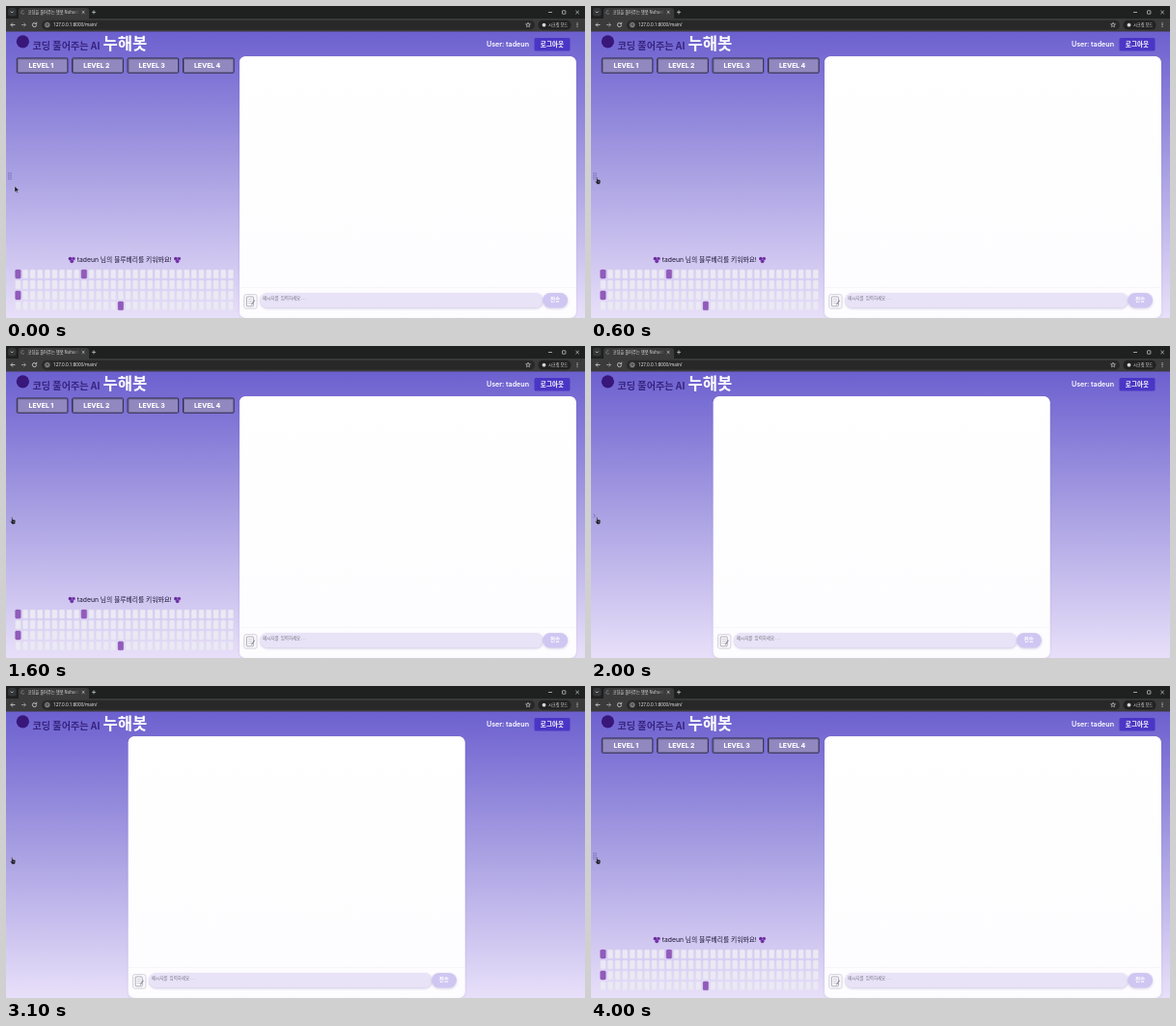
Write an HTML page with a canvas that moves like this. It is 600x323 px and loops after 4.1 s.

```html
<!DOCTYPE html>
<html lang="ko">
<head>
<meta charset="utf-8">
<style>
html, body { margin: 0; width: 100%; height: 100%; overflow: hidden; background: #6c61cf; }
canvas { display: block; width: 600px; height: 323px; }
</style>
</head>
<body>
<canvas id="stage"></canvas>
<script>
const W = 600, H = 323, LOOP = 4100;
const USER = 'tadeun', BRAND = '누해봇';
const KR = '"Noto Sans CJK KR", "Noto Sans CJK", sans-serif';
const MONO = '"Noto Sans Mono CJK KR", "Noto Sans CJK KR", "Noto Sans CJK", monospace';
const LATIN = 'Inter, ' + KR;

const cv = document.getElementById('stage');
const g = cv.getContext('2d');
const dpr = window.devicePixelRatio || 1;
cv.width = W * dpr;
cv.height = H * dpr;

function box(x, y, w, h, r, fill, stroke, lw = 1) {
  g.beginPath();
  g.roundRect(x, y, w, h, r);
  if (fill) { g.fillStyle = fill; g.fill(); }
  if (stroke) { g.strokeStyle = stroke; g.lineWidth = lw; g.stroke(); }
}

function disc(x, y, r, fill) {
  g.beginPath();
  g.arc(x, y, r, 0, Math.PI * 2);
  g.fillStyle = fill;
  g.fill();
}

function line(color, lw, ...p) {
  g.beginPath();
  g.moveTo(p[0], p[1]);
  for (let i = 2; i < p.length; i += 2) g.lineTo(p[i], p[i + 1]);
  g.strokeStyle = color;
  g.lineWidth = lw;
  g.stroke();
}

function text(s, x, y, size, color, weight = 400, align = 'left', family = KR) {
  g.font = `${weight} ${size}px ${family}`;
  g.textAlign = align;
  g.fillStyle = color;
  g.fillText(s, x, y);
}

function blend(x0, y0, x1, y1, ...colors) {
  const b = g.createLinearGradient(x0, y0, x1, y1);
  colors.forEach((c, i) => b.addColorStop(i / (colors.length - 1), c));
  return b;
}

function shadow(color, blur, dy) {
  g.shadowColor = color;
  g.shadowBlur = blur * dpr;
  g.shadowOffsetY = dy * dpr;
}

function browser() {
  const ink = '#d6d6d6';
  box(0, 0, W, 14, 0, '#1f2020');
  box(0, 13, W, 13.5, 0, '#3b3b3c');
  box(2, 2, 8.5, 8.5, 2.5, '#353637');
  line(ink, 0.8, 4.8, 5.6, 6.2, 7, 7.6, 5.6);
  box(13, 2, 73, 13, [3, 3, 0, 0], '#3b3b3c');
  g.beginPath();
  g.arc(17.5, 6.5, 1.8, 0.5, 5.3);
  g.strokeStyle = '#909090';
  g.lineWidth = 0.7;
  g.stroke();
  text('코딩을 풀어주는 챗봇 Nuhaeb', 22.5, 8.1, 4.25, blend(68, 0, 76, 0, '#e2e2e2', '#3b3b3c'));
  line(ink, 0.7, 78.7, 5, 81.5, 7.8);
  line(ink, 0.7, 81.5, 5, 78.7, 7.8);
  line(ink, 0.7, 89, 6.4, 93, 6.4);
  line(ink, 0.7, 91, 4.4, 91, 8.4);
  line(ink, 0.7, 562, 6.5, 566, 6.5);
  box(576.5, 4.8, 3.4, 3.4, 0.4, null, ink, 0.7);
  line(ink, 0.7, 590.4, 4.8, 593.8, 8.2);
  line(ink, 0.7, 593.8, 4.8, 590.4, 8.2);

  line(ink, 0.8, 9.4, 19.5, 5, 19.5);
  line(ink, 0.8, 7, 17.5, 5, 19.5, 7, 21.5);
  line('#a5a5a5', 0.8, 16, 19.5, 20.4, 19.5);
  line('#a5a5a5', 0.8, 18.4, 17.5, 20.4, 19.5, 18.4, 21.5);
  g.beginPath();
  g.arc(29.5, 19.5, 2.1, 0, 5.2);
  g.strokeStyle = ink;
  g.lineWidth = 0.8;
  g.stroke();
  line(ink, 0.8, 31.8, 16.8, 31.6, 18.6, 29.8, 18.5);

  box(37, 14.7, 511, 10, 5, '#282828');
  disc(42.8, 19.6, 3.6, '#3a3a3a');
  g.beginPath();
  g.arc(42.8, 19.6, 2, 0, 7);
  g.strokeStyle = ink;
  g.lineWidth = 0.6;
  g.stroke();
  line(ink, 0.6, 42.8, 19.3, 42.8, 20.7);
  text('127.0.0.1:8000/main/', 49, 21.4, 4.6, '#e6e6e6', 400, 'left', '"Noto Sans", sans-serif');

  g.beginPath();
  for (let i = 0; i < 10; i++) {
    const a = i * Math.PI / 5 - Math.PI / 2, r = i % 2 ? 1.1 : 2.6;
    g.lineTo(541 + r * Math.cos(a), 19.6 + r * Math.sin(a));
  }
  g.closePath();
  g.stroke();
  box(551.5, 14.8, 34, 9.8, 4.9, '#222223');
  disc(557.5, 19.7, 1.9, '#d6d6d6');
  text('시크릿 모드', 562, 21.3, 4.2, '#ededed');
  for (let i = -1; i < 2; i++) disc(592, 19.6 + i * 1.7, 0.55, ink);
}

function header() {
  disc(17.4, 36.8, 6.6, '#38167a');
  text('코딩 풀어주는 AI', 27.5, 44.8, 10.1, '#37247f', 700);
  text(BRAND, 100.5, 45.3, 16.6, '#ffffff', 900);
  text('User: ' + USER, 542, 42.2, 7.1, '#ffffff', 600, 'right', LATIN);
  box(547.5, 33, 37, 13.5, 1.5, '#4a36c5');
  text('로그아웃', 566, 42.2, 6.6, '#ffffff', 700, 'center');
}

function berries(x, y) {
  disc(x - 1.7, y - 1.2, 1.9, '#6f35a5');
  disc(x + 1.7, y - 1.2, 1.9, '#8745b8');
  disc(x, y + 1.5, 1.9, '#7a3cae');
  disc(x - 1.7, y - 1.4, 0.6, '#4a2180');
  disc(x + 1.7, y - 1.4, 0.6, '#4a2180');
  disc(x, y + 1.3, 0.6, '#4a2180');
}

function sidebar() {
  for (let i = 0; i < 4; i++) {
    const x = 10.8 + i * 57.4;
    box(x + 0.5, 54, 52.6, 15.2, 1, '#9188bf', '#2b2740', 1);
    line('#565071', 0.8, x + 1.3, 68.6, x + 1.3, 54.8, x + 52.3, 54.8);
    text('LEVEL ' + (i + 1), x + 25.6, 64.2, 6.8, '#ffffff', 800, 'center', LATIN);
  }
  berries(68.2, 262.8);
  berries(177.6, 262.8);
  text(USER + ' 님의 블루베리를 키워봐요!', 122.8, 265.2, 6.75, '#1d1433', 400, 'center', LATIN);

  const grown = ['0,0', '9,0', '0,2', '14,3'];
  for (let r = 0; r < 4; r++) {
    for (let c = 0; c < 30; c++) {
      const on = grown.includes(c + ',' + r);
      box(9.7 + c * 7.6, 273.1 + r * 10.95, 5.5, 8.9, 1.2, on ? '#925bbb' : '#ebe9f4', on ? '#8450ad' : '#e0dcf0', 0.4);
    }
  }
}

function chat(x) {
  g.save();
  g.translate(x, 0);
  shadow('rgba(70,50,140,0.16)', 3, 0.5);
  box(0, 52.3, 348.7, 270.5, 6, '#ffffff');
  shadow('transparent', 0, 0);
  box(0, 52.3, 348.7, 270.5, 6, blend(0, 52, 0, 323, '#ffffff', '#fdfcfe'));
  line('#f5f3f9', 0.7, 0.5, 291.5, 348, 291.5);

  box(4.7, 298.6, 13.4, 14.6, 2, '#f8f7fb', '#cfcbd9', 0.8);
  box(7.4, 301, 7, 9.8, 0.8, '#ffffff', '#8f8b9c', 0.7);
  for (let i = 0; i < 3; i++) line('#aaa6b6', 0.6, 8.8, 303.4 + i * 2.1, 13, 303.4 + i * 2.1);
  line('#8f8b9c', 1.1, 15.6, 304.6, 12.4, 309.2);

  shadow('rgba(90,70,160,0.28)', 2.5, 1);
  box(21.3, 297, 293.4, 15.3, 7.5, '#e9e3f7');
  box(314.3, 297, 25.8, 15.2, 7.6, blend(314, 0, 340, 6, '#a37ce9', '#b39bee', '#cfc7f2'));
  shadow('transparent', 0, 0);
  text('메시지를 입력하세요...', 24.2, 303.9, 4.45, '#77727f', 400, 'left', MONO);
  text('전송', 327, 306.2, 5.5, '#ffffff', 700, 'center');
  g.restore();
}

function handle(open, alpha) {
  g.globalAlpha = alpha;
  if (open) {
    g.setLineDash([1.3, 0.7]);
    line('#5c529f', 0.8, 2.9, 172.5, 2.9, 180);
    line('#5c529f', 0.8, 5.1, 172.5, 5.1, 180);
    g.setLineDash([]);
  } else {
    line('#655ba8', 0.7, 2.6, 174, 4.4, 175.8, 2.6, 177.6);
  }
  g.globalAlpha = 1;
}

function arrow(x, y) {
  g.beginPath();
  [[0, 0], [0, 6.2], [1.5, 4.9], [2.5, 7], [3.5, 6.5], [2.5, 4.5], [4.5, 4.4]]
    .forEach(([a, b]) => g.lineTo(x + a, y + b));
  g.closePath();
  g.fillStyle = '#17151f';
  g.fill();
  g.strokeStyle = '#d9d5f2';
  g.lineWidth = 0.4;
  g.stroke();
}

function hand(x, y) {
  g.beginPath();
  [[1.3, 0], [2.2, 0.2], [2.4, 2.6], [4.8, 3.2], [5.5, 4], [5.2, 6.3], [4.5, 7.7], [1.9, 7.7], [0, 4.9], [0.4, 4.2], [1.3, 4.9]]
    .forEach(([a, b]) => g.lineTo(x + a, y + b));
  g.closePath();
  g.fillStyle = '#1c1926';
  g.fill();
  g.strokeStyle = '#d0cbee';
  g.lineWidth = 0.35;
  g.stroke();
  line('#c4bfe2', 0.35, x + 3, y + 4.2, x + 3, y + 5.8);
  line('#c4bfe2', 0.35, x + 4, y + 4.4, x + 4, y + 5.8);
}

function draw(t) {
  const open = t < 2000 || t >= 3600;
  let grip = 1;
  if ((t >= 1600 && t < 2000) || (t >= 3100 && t < 3600)) grip = 0;
  else if (t >= 3000 && t < 3100) grip = 0.5;

  g.setTransform(dpr, 0, 0, dpr, 0, 0);
  g.fillStyle = blend(0, 26, 0, H, '#6c60cf', '#aaa1e3', '#e8e0f9');
  g.fillRect(0, 0, W, H);
  browser();
  header();
  if (open) sidebar();
  chat(open ? 242 : 126.8);
  handle(open, grip);
  if (t < 500) arrow(9, 186.6);
  else if (t < 600) arrow(6.6, 180.5);
  else hand(4.4, 176.9);
}

const start = performance.now();
function tick() {
  draw((performance.now() - start) % LOOP);
  requestAnimationFrame(tick);
}
tick();
</script>
</body>
</html>
```
